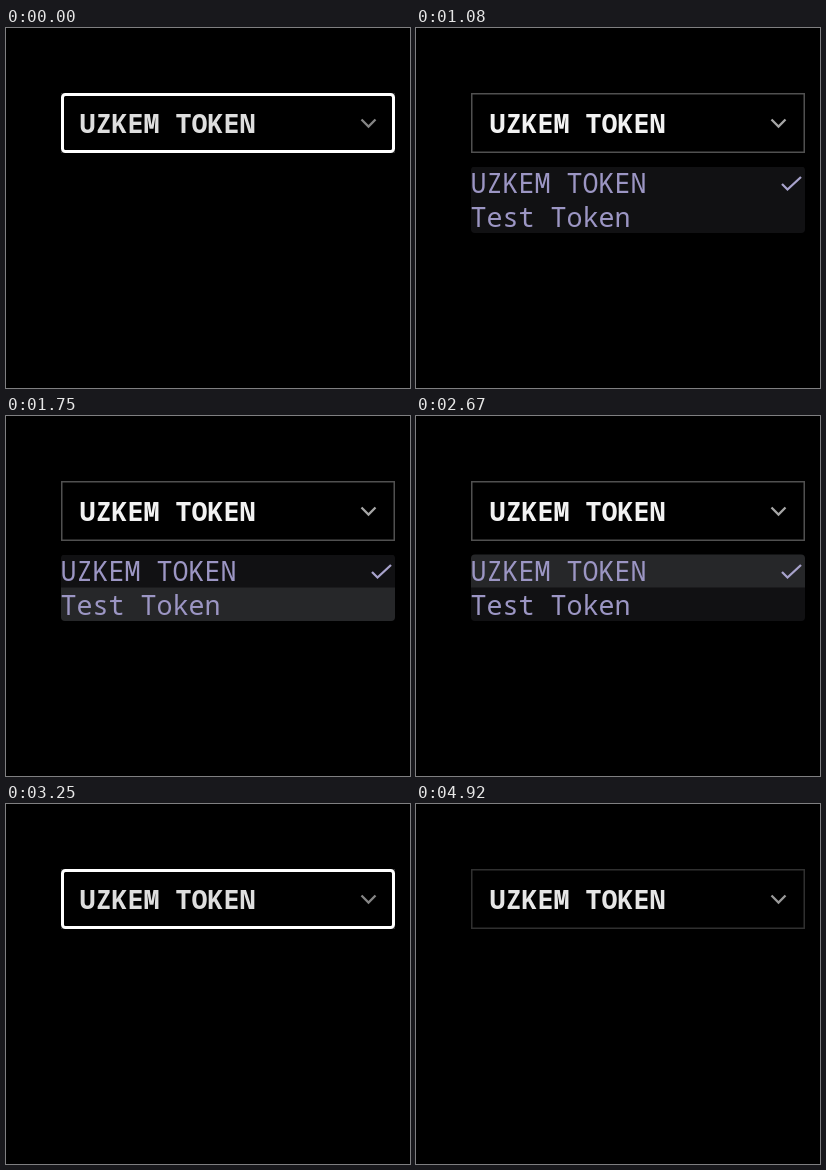
An HTML page that plays this animation: 404 by 360 pixels, repeating every 5.25 s.

```html
<!DOCTYPE html>
<html lang="en">
<head>
<meta charset="utf-8">
<title>Token select</title>
<style>
  html, body { margin: 0; width: 100%; height: 100%; overflow: hidden; background: #000; }
  svg { display: block; width: 404px; height: 360px; filter: blur(0.45px); }
  text { font: 600 26.7px "Noto Sans Mono", "DejaVu Sans Mono", monospace; white-space: pre; }
  path { fill: none; stroke-width: 2.3; }
  #menu text { font-weight: 500; fill: #9c96c4; }
  #menu path { stroke: #a8a3cc; }
</style>
</head>
<body>
<svg viewBox="0 0 404 360">
  <defs>
    <clipPath id="panel"><rect x="55" y="138.5" width="334" height="66.5" rx="4"/></clipPath>
  </defs>
  <g id="menu">
    <g clip-path="url(#panel)">
      <rect x="55" y="138" width="334" height="67" fill="#111113"/>
      <rect id="first" x="55" y="138" width="334" height="33.5" fill="#262729"/>
      <rect id="second" x="55" y="171.5" width="334" height="33.5" fill="#262729"/>
    </g>
    <text x="54.5" y="165">UZKEM TOKEN</text>
    <text x="54.5" y="199">Test Token</text>
    <path d="M366 156l5.500 5.500L385 149"/>
  </g>
  <rect id="border" x="55.750" y="65.750" width="332.500" height="58.500" fill="#000" stroke-width="1.500"/>
  <rect id="ring" x="56.500" y="66.500" width="331" height="57" rx="3" fill="none" stroke="#fff" stroke-width="3"/>
  <text id="label" x="73.500" y="105">UZKEM TOKEN</text>
  <path id="chevron" d="M355.500 91.500l7 7l7-7"/>
</svg>
<script>
  const LOOP = 5250;

  // Each step is [time in ms, value]; values hold until the next step.
  function hold(id, property, steps) {
    const frames = steps.map(([time, value]) => ({
      offset: time / LOOP, [property]: value, easing: 'step-end'
    }));
    frames.push({ offset: 1, [property]: steps.at(-1)[1] });
    const animation = document.getElementById(id).animate(frames, { duration: LOOP, iterations: Infinity });
    animation.startTime = 0;
  }

  hold('ring', 'opacity', [[0, 1], [920, 0], [3080, 1], [4750, 0]]);
  hold('border', 'stroke', [[0, '#303030'], [920, '#505050'], [3080, '#303030']]);
  hold('label', 'fill', [[0, '#dedede'], [920, '#f2f2f2'], [3080, '#e8e8e8'], [3250, '#dedede'], [4750, '#e6e6e6']]);
  hold('chevron', 'stroke', [[0, '#858585'], [920, '#a6a6a6'], [3080, '#949494'], [3250, '#858585'], [4750, '#999']]);

  hold('menu', 'opacity', [[0, 0], [920, 0.08], [1000, 0.8], [1080, 1], [3080, 0.6], [3160, 0.15], [3250, 0]]);
  hold('menu', 'transform', [
    [0, 'translateY(-12px)'], [1000, 'translateY(-3px)'], [1080, 'translateY(0px)'],
    [3080, 'translateY(-5px)'], [3160, 'translateY(-11px)'], [3250, 'translateY(-12px)']
  ]);

  // The pointer passes down through the rows and back up.
  hold('first', 'opacity', [[0, 0], [1580, 1], [1750, 0], [2670, 1], [2750, 0]]);
  hold('second', 'opacity', [[0, 0], [1750, 1], [2670, 0]]);
</script>
</body>
</html>
```
